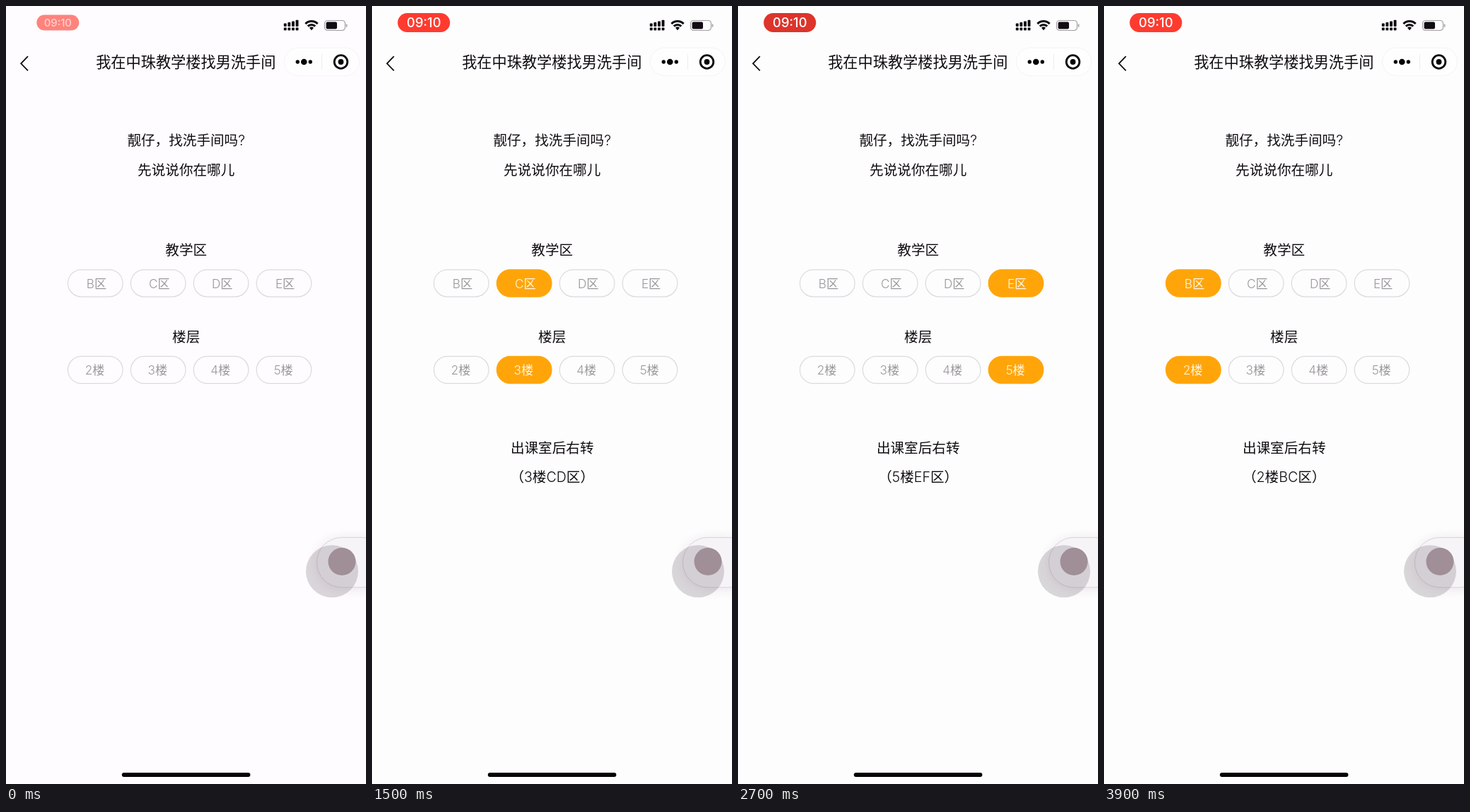
Animation, 509 px wide and 1100 px high, one loop 4 s. Source, as an HTML page with a canvas:

```html
<!DOCTYPE html>
<html lang="zh-CN">
<head>
<meta charset="utf-8">
<style>
html, body { margin: 0; width: 100%; height: 100%; overflow: hidden; background: #fdfdfd; }
canvas { display: block; width: 509px; height: 1100px; }
</style>
</head>
<body>
<canvas id="stage"></canvas>
<script>
const W = 509, H = 1100, LOOP = 4000, STEP = 100;
const canvas = document.getElementById('stage');
const ctx = canvas.getContext('2d');
const dpr = window.devicePixelRatio || 1;
canvas.width = W * dpr;
canvas.height = H * dpr;

const FONT = 'Inter, "Noto Sans CJK SC", "Noto Sans CJK", sans-serif';
const INK = '#100c12', ORANGE = '#ffa50a';
const AREAS = ['B', 'C', 'D', 'E'], FLOORS = [2, 3, 4, 5];

// Taps: time, chosen area, chosen floor
const TAPS = [
  [0, '', 0], [700, 'C', 0], [1300, 'C', 3], [1900, 'C', 4],
  [2300, 'E', 4], [2600, 'E', 5], [3100, 'E', 3], [3500, 'B', 3], [3800, 'B', 2]
];

function text(str, x, cy, size, color = INK, weight = 350) {
  ctx.font = `${weight} ${size}px ${FONT}`;
  ctx.textAlign = 'center';
  ctx.fillStyle = color;
  ctx.fillText(str, x, cy + size * 0.38);
}

function box(x, y, w, h, r, fill, stroke, line = 1) {
  ctx.beginPath();
  ctx.roundRect(x, y, w, h, r);
  if (fill) { ctx.fillStyle = fill; ctx.fill(); }
  if (stroke) { ctx.strokeStyle = stroke; ctx.lineWidth = line; ctx.stroke(); }
}

function disc(x, y, r, fill) {
  ctx.beginPath();
  ctx.arc(x, y, r, 0, Math.PI * 2);
  ctx.fillStyle = fill;
  ctx.fill();
}

// Recording badge: pops in, then pulses between bright and dark red
function badge(t) {
  const shown = t < 200 ? 0 : Math.min(1, (t - 100) / 200);
  const scale = 0.81 + 0.19 * shown;
  const wave = 0.5 + 0.5 * Math.cos((t - 880) / 1840 * Math.PI * 2);
  const dark = t < 300 ? 0 : Math.max(0, Math.min(1, wave * 1.35 - 0.35));
  const mix = (a, b) => Math.round(a + (b - a) * dark);
  ctx.save();
  ctx.globalAlpha = 0.62 + 0.38 * shown;
  ctx.translate(73.3, 23.5);
  ctx.scale(scale, scale);
  box(-37, -13.5, 74, 27, 13.5, `rgb(${mix(255, 221)},${mix(59, 52)},${mix(48, 43)})`);
  text('09:10', 0, 0, 18.4, '#fff', 500);
  ctx.restore();
}

function statusIcons() {
  for (let i = 0; i < 4; i++) {
    const x = 392.8 + i * 5.6;
    box(x, 24.6 - i * 1.6, 3.9, 4.4 + i * 1.6, 1, INK);
    box(x, 30.6, 3.9, 3.9, 1, INK);
  }
  // Wi-Fi
  ctx.strokeStyle = INK;
  ctx.lineWidth = 3;
  for (const r of [12.2, 7.4]) {
    ctx.beginPath();
    ctx.arc(432, 33.8, r, -Math.PI * 0.75, -Math.PI * 0.25);
    ctx.stroke();
  }
  ctx.beginPath();
  ctx.moveTo(432, 34.6);
  ctx.arc(432, 33.8, 4.2, -Math.PI * 0.75, -Math.PI * 0.25);
  ctx.closePath();
  ctx.fillStyle = INK;
  ctx.fill();
  // Battery
  box(450.5, 20.5, 29, 14, 4.4, null, '#a29fa3', 1.2);
  box(452.6, 22.6, 15.4, 9.9, 2, INK);
  box(480.8, 25.5, 1.6, 4.4, 0.8, '#a29fa3');
}

function header() {
  ctx.strokeStyle = INK;
  ctx.lineWidth = 1.8;
  ctx.beginPath();
  ctx.moveTo(31, 71.2);
  ctx.lineTo(21.2, 81.3);
  ctx.lineTo(31, 91.4);
  ctx.stroke();
  text('我在中珠教学楼找男洗手间', 254.3, 79.3, 21.2, INK, 500);
  box(393.5, 59, 106, 39.5, 19.7, '#fefefe', '#f5f3f6');
  for (const [x, r] of [[412.3, 2.7], [421.3, 4.3], [430.3, 2.7]]) disc(x, 79, r, '#050305');
  box(446, 68, 1, 22, 0, '#eeecef');
  disc(473.5, 79, 10.7, '#050305');
  disc(473.5, 79, 7.9, '#fefefe');
  disc(473.5, 79, 3.9, '#050305');
}

function options(items, chosen, y, suffix, shift) {
  items.forEach((item, i) => {
    const x = 87.5 + i * 88.9, on = item === chosen;
    box(x, y, 77.6, 38.3, 19.1, on ? ORANGE : null, on ? ORANGE : '#dcdadf', 1.2);
    text(item + suffix, x + 38.6 + shift, y + 19.2, 17.2, on ? '#fff8ea' : '#9b979c');
  });
}

function floatingTab() {
  ctx.save();
  ctx.shadowColor = 'rgba(90,40,85,.13)';
  ctx.shadowBlur = 16 * dpr;
  ctx.shadowOffsetY = 2 * dpr;
  box(439.5, 751.5, 100, 70.5, 35.2, '#f7f4f7');
  ctx.restore();
  box(439.5, 751.5, 100, 70.5, 35.2, null, '#d9d3d8');
  disc(461, 799.3, 37, 'rgba(120,108,120,.27)');
  disc(475, 785.5, 19.5, '#a08f97');
}

function draw(t) {
  const [, area, floor] = TAPS.filter(tap => tap[0] <= t).pop();
  ctx.setTransform(dpr, 0, 0, dpr, 0, 0);
  ctx.fillStyle = floor ? '#fdfdfd' : '#fefcfe';
  ctx.fillRect(0, 0, W, H);

  badge(t);
  statusIcons();
  header();
  text('靓仔，找洗手间吗?', 254.7, 190, 19.6);
  text('先说说你在哪儿', 254.7, 231.5, 19.6);
  text('教学区', 254.7, 344.5, 19.6);
  options(AREAS, area, 372.8, '区', 1.8);
  text('楼层', 254.7, 467.5, 19.6);
  options(FLOORS, floor, 495.4, '楼', -0.6);

  if (floor) {
    const left = area === 'C' && floor === 4;
    const zone = area === 'E' ? 'EF' : area === 'C' && !left ? 'CD' : 'BC';
    text(`出课室后${left ? '左' : '右'}转`, 254.7, 624.5, 19.6);
    text(`（${floor}楼${zone}区）`, 254.7, 666, 19.6);
  }

  floatingTab();
  box(163.8, 1084, 181.6, 6, 3, '#050305');
}

function tick() {
  const t = performance.now() % LOOP;
  draw(Math.floor(t / STEP) * STEP);
  requestAnimationFrame(tick);
}
tick();
</script>
</body>
</html>
```
